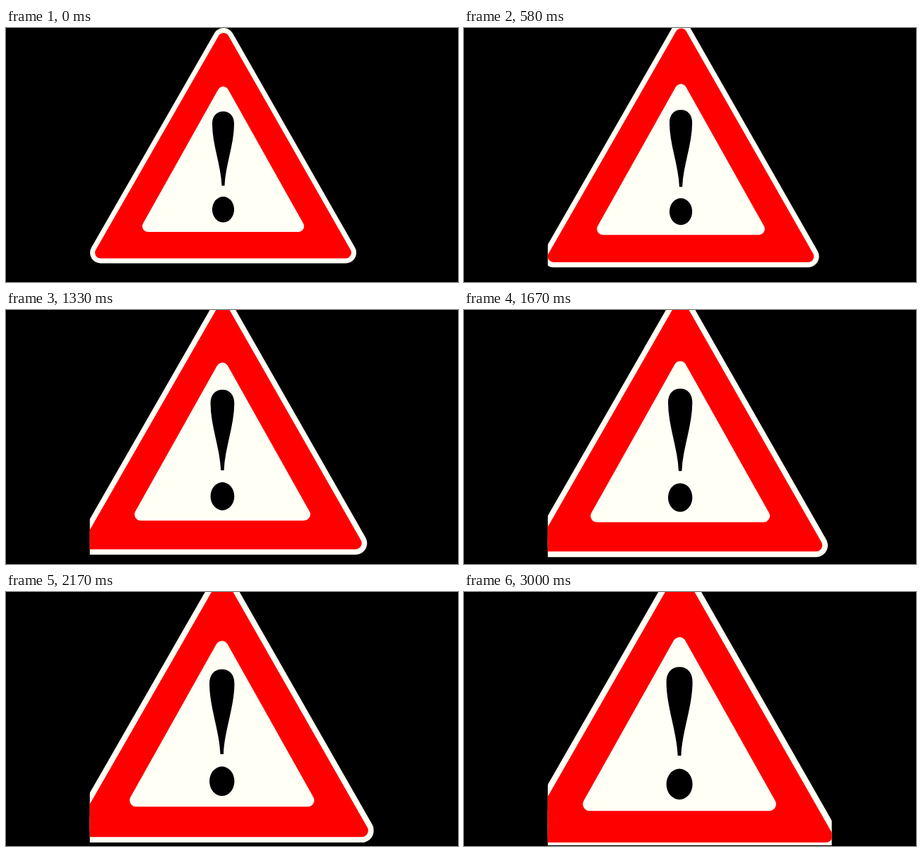
Recreate the animation shown at these times as an HTML page. Size 640 by 360 pixels, loop 3.08 s.

```html
<!DOCTYPE html>
<html lang="en">
<head>
<meta charset="utf-8">
<title>Warning sign</title>
<style>
  html, body { margin: 0; width: 100%; height: 100%; overflow: hidden; background: #000; }
  svg { display: block; width: 100%; height: 100%; }
  .triangle { stroke-linejoin: round; }
  .white { fill: #fffff6; stroke: #fffff6; }
  .red { fill: #fe0000; stroke: #fe0000; }
</style>
</head>
<body>
<svg viewBox="0 0 640 360">
  <defs>
    <clipPath id="window"><rect x="118.7" y="0" width="402" height="359"/></clipPath>
    <path id="outline" d="M308 15 L481 318.5 H134 Z"/>
  </defs>
  <g clip-path="url(#window)">
    <g id="sign">
      <use href="#outline" class="triangle white" stroke-width="30"/>
      <use href="#outline" class="triangle red" stroke-width="16"/>
      <path class="triangle white" stroke-width="16" d="M307.5 91 L414 281 H201 Z"/>
      <path d="M305.5 223.5 C304.5 195 292 165 292 136 C292 125 298 118.3 307.5 118.3
               C317 118.3 323 125 323 136 C323 165 310.5 195 309.5 223.5 Z"/>
      <ellipse cx="307.5" cy="257.3" rx="15.5" ry="18.3"/>
    </g>
  </g>
</svg>
<script>
  const LOOP = 3080;
  const GROWTH = 0.195;
  const LAST_STEP = 36;
  const sign = document.getElementById('sign');

  // Three steps every 250 ms, at 0, 80 and 170 ms.
  function stepAt(time) {
    const rest = time % 250;
    return Math.floor(time / 250) * 3 + (rest >= 80) + (rest >= 170);
  }

  function draw() {
    const scale = 1 + GROWTH * stepAt(performance.now() % LOOP) / LAST_STEP;
    sign.setAttribute('transform', `translate(320 180) scale(${scale}) translate(-320 -180)`);
    requestAnimationFrame(draw);
  }
  draw();
</script>
</body>
</html>
```
